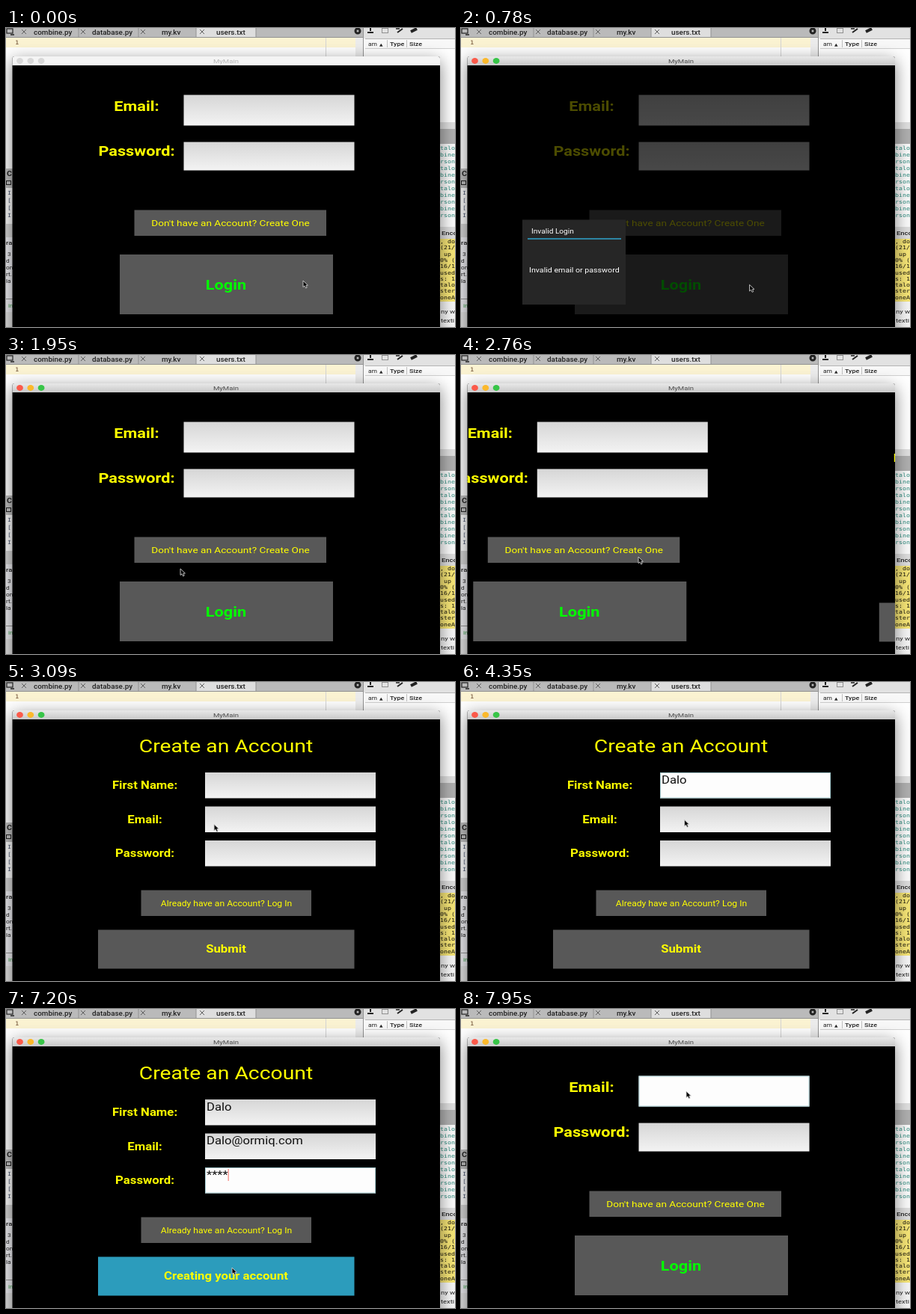
Write an HTML page with a canvas that moves like this. It is 600 px wide and 400 px high and loops after 8000 ms.

```html
<!DOCTYPE html>
<html lang="en">
<head>
<meta charset="utf-8">
<title>Account sign-up</title>
<style>
  html, body { margin: 0; width: 100%; height: 100%; overflow: hidden; background: #000; }
  canvas { display: block; width: 600px; height: 400px; }
</style>
</head>
<body>
<canvas id="stage" width="600" height="400"></canvas>
<script>
const ctx = document.getElementById('stage').getContext('2d');

const LOOP = 8000;
const ASPECT = 1.18; // the whole screen is shown wider than its pixels
const WIN = { x: 8.5, y: 38, w: 571.5, bar: 12 };
const SANS = 'Roboto, "Open Sans", sans-serif';
const MONO = '"DejaVu Sans Mono", monospace';
const YELLOW = '#ffff00', GREY = '#585858', PRESSED = '#2c9cbc';
const INK = '#222', RULE = '#929292', TEAL = '#2a8a7c';

const NAME = 'Dalo', EMAIL = 'Dalo@ormiq.com', USER = 'talok';

// Moments of the story, in ms
const T = {
  active: 300, loginDown: 560, popup: 690, dismiss: 1680,
  createDown: 2580, toCreate: 2713.5,
  focusName: 3400, focusEmail: 4480, focusPass: 5980,
  submitDown: 7080, toLogin: 7300, focusLogin: 7690
};
const SLIDE = 200, FADE = 60, BLINK = 250;

// Pointer path: time, x, y
const PATH = [
  [0, 397, 338], [250, 394, 340], [700, 388, 344], [840, 384, 343], [1300, 228, 302],
  [1700, 229, 302], [2200, 237, 270], [2800, 237, 270], [3300, 303, 142],
  [4150, 303, 142], [4400, 298, 189], [5700, 299, 188], [5960, 305, 231],
  [6720, 305, 231], [7040, 302, 346], [7420, 302, 346], [7680, 301, 110], [8000, 301, 110]
];

const clamp = v => Math.max(0, Math.min(1, v));
const ease = v => v * v * (3 - 2 * v);
const between = (t, a, b) => t >= a && t < b;
const typed = (s, t, start, step) =>
  s.slice(0, Math.max(0, Math.floor((t - start) / step) + 1));

function rect(x, y, w, h, fill) {
  ctx.fillStyle = fill;
  ctx.fillRect(x, y, w, h);
}

function line(x1, y1, x2, y2, color, width = 1) {
  ctx.strokeStyle = color;
  ctx.lineWidth = width;
  ctx.beginPath();
  ctx.moveTo(x1, y1);
  ctx.lineTo(x2, y2);
  ctx.stroke();
}

function shade(y, h, top, bottom) {
  const g = ctx.createLinearGradient(0, y, 0, y + h);
  g.addColorStop(0, top);
  g.addColorStop(1, bottom);
  return g;
}

function text(s, x, y, size, color, { weight = 400, align = 'left', font = SANS } = {}) {
  ctx.save();
  ctx.translate(x, y);
  ctx.scale(ASPECT, 1);
  ctx.font = `${weight} ${size}px ${font}`;
  ctx.textAlign = align;
  ctx.fillStyle = color;
  ctx.fillText(s, 0, 0);
  ctx.restore();
}

function lines(list, x, y, step, size, color, font = MONO) {
  list.forEach((s, i) => text(s, x, y + i * step, size, color, { font }));
}

function label(s, x, y, size, color = YELLOW, weight = 700) {
  text(s, x, y, size, color, { weight, align: 'center' });
}

function button(x, y, w, h, down) {
  rect(x, y, w, h, down ? PRESSED : GREY);
}

function field(x, y, w, h, value, t, focusAt, blurAt) {
  const focus = between(t, focusAt, blurAt);
  rect(x, y, w, h, focus ? '#fdfdfd' : shade(y, h, '#d6d6d6', '#f3f3f3'));
  if (focus) {
    ctx.strokeStyle = '#a8cfd4';
    ctx.lineWidth = 1;
    ctx.strokeRect(x + .5, y + .5, w - 1, h - 1);
  }
  text(value, x + 2, y + 14.5, 14.1, '#111');
  if (focus && Math.floor((t - focusAt) / BLINK) % 2 === 0) {
    ctx.font = `14.1px ${SANS}`;
    const cx = x + 2.5 + ctx.measureText(value).width * ASPECT;
    line(cx, y + 2, cx, y + 18, '#f46a60');
  }
}

function drawTabs() {
  rect(0, 0, 477, 12, '#bababa');
  rect(254, 0, 80, 12, '#dedede');
  for (const x of [97, 177, 254, 334]) line(x, 0, x, 12, RULE);
  [[24, 37, 'combine.py'], [103, 115, 'database.py'], [183, 208, 'my.kv'], [262, 281, 'users.txt']]
    .forEach(([cx, tx, s]) => {
      line(cx - 3, 2, cx + 3, 8, '#606060');
      line(cx - 3, 8, cx + 3, 2, '#606060');
      text(s, tx, 8.5, 8.4, INK, { weight: 500 });
    });
  line(0, 12.5, 477, 12.5, RULE);
  ctx.strokeStyle = INK;
  ctx.lineWidth = 1.2;
  ctx.strokeRect(1, 1, 8, 6);
  line(6, 9, 11, 9, INK, 1.5);
  ctx.lineWidth = 3;
  ctx.beginPath();
  ctx.arc(470, 4, 3, 0, 7);
  ctx.stroke();
}

function drawFilePanel() {
  rect(477, 0, 123, 128, '#ffffff');
  rect(477, 0, 123, 14, '#e2e2e2');
  rect(480, 14, 120, 13, '#f8f8f8');
  line(477.5, 0, 477.5, 38, RULE);
  line(480, 14.5, 600, 14.5, '#b4b4b4');
  line(480, 27.5, 600, 27.5, '#d0d0d0');
  line(487, 0, 487, 4, INK, 2);
  line(483, 6, 491, 6, INK, 2);
  ctx.strokeStyle = '#909090';
  ctx.lineWidth = 1;
  ctx.strokeRect(502.5, .5, 8, 6);
  line(521, 1, 526, 1, INK, 1.5);
  line(523, 6, 530, 1, INK, 2);
  line(541, 5, 549, 1, INK, 4);
  text('am', 484, 24, 7.2, INK);
  text('▲', 499, 23.5, 5, INK, { font: '"DejaVu Sans", sans-serif' });
  text('Type', 513, 24, 7.6, INK, { weight: 500 });
  text('Size', 539, 24, 7.6, INK, { weight: 500 });
  line(509.5, 16, 509.5, 26, '#c0c0c0');
  line(535.5, 16, 535.5, 26, '#c0c0c0');
}

function drawDesktop() {
  rect(0, 0, 600, 400, '#ececf0');
  rect(0, 13, 477, 175, '#fefefe');
  rect(0, 13, 467, 13, '#fbf3d2');
  rect(467, 13, 10, 30, '#ececec');
  line(427.5, 13, 427.5, 38, '#d4d4d4');
  text('1', 12, 22, 7.5, '#6a4a30', { font: MONO });
  drawTabs();
  drawFilePanel();

  // Right edge
  rect(578, 126, 22, 9, '#e0e0e0');
  rect(578, 135, 22, 20, '#b0b0b0');
  rect(578, 155, 22, 112, '#fbfbfb');
  const path = [USER, 'bine/', 'rsona'];
  lines([...path, ...path, ...path], 580, 163, 9, 7, TEAL);
  lines(['bine/', 'rsona'], 580, 244, 8.5, 7, TEAL);
  rect(578, 266, 22, 16, '#dedede');
  text('Enco', 582, 277, 8, INK, { weight: 500 });
  rect(578, 282, 22, 84, '#f6e576');
  lines([', do', '(21/', ' up', '0% (', '16/1', 'used', 's: 1', USER, 'ster', 'oneA'],
    580, 288, 8.3, 7, '#15130a');
  rect(578, 366, 22, 34, '#f6f6f6');
  lines(['ny w', 'texti'], 581, 382, 12, 8, INK, SANS);

  // Left edge
  rect(0, 188, 9, 26, '#bdbdbd');
  text('C', 1, 198, 9, INK, { weight: 700 });
  ctx.strokeStyle = INK;
  ctx.lineWidth = 1;
  ctx.strokeRect(.5, 204.5, 6, 5);
  rect(0, 214, 9, 48, '#fbfbfb');
  lines(['I', '[', '[', 'I'], 2, 223, 10, 7, '#45506a');
  rect(0, 262, 9, 18, '#d4d4d4');
  text('ra', 0, 290, 8, INK, { weight: 500 });
  lines([' 3', 'd', 'on', 'rt.', 'la'], 0, 305, 9, 7, INK, SANS);
  line(0, 362.5, 9, 362.5, RULE);
  text('in', 3, 374, 7, '#3f9f4c');
  rect(0, 380, 9, 20, '#e0e0e0');
}

function drawWindowFrame(t) {
  const on = t >= T.active;
  ctx.save();
  ctx.shadowColor = 'rgba(0,0,0,.5)';
  ctx.shadowBlur = 22;
  ctx.shadowOffsetY = 6;
  ctx.fillStyle = '#000';
  ctx.beginPath();
  ctx.roundRect(WIN.x, WIN.y, WIN.w, 420, 3);
  ctx.fill();
  ctx.restore();

  ctx.fillStyle = on ? shade(38, 12, '#e8e8e8', '#c8c8c8') : '#f4f4f4';
  ctx.beginPath();
  ctx.roundRect(WIN.x, WIN.y, WIN.w, WIN.bar, [3, 3, 0, 0]);
  ctx.fill();
  ['#fb5a4a', '#fbb92c', '#38c548'].forEach((c, i) => {
    ctx.fillStyle = on ? c : '#d8d8d8';
    ctx.beginPath();
    ctx.ellipse(18.5 + i * 14.3, 44, 4.4, 3.9, 0, 0, 7);
    ctx.fill();
  });
  label('MyMain', 294, 47, 8.1, on ? '#484848' : '#b4b4b4', 400);
}

function drawLogin(t) {
  label('Email:', 174.5, 111, 18.4);
  label('Password:', 174.5, 171, 18.4);
  field(237.5, 89.5, 228, 41, '', t, T.focusLogin, LOOP);
  field(237.5, 152.5, 228, 38, '', t, LOOP, LOOP);
  button(171.5, 243.5, 256.5, 34.5, between(t, T.createDown, T.toCreate));
  label("Don't have an Account? Create One", 300, 265, 11.55, YELLOW, 400);
  button(152, 303, 285, 80, between(t, T.loginDown, T.popup));
  label('Login', 294, 349.5, 18.4, '#00ff00');
}

function drawCreate(t) {
  label('Create an Account', 294, 94, 24, YELLOW, 400);
  label('First Name:', 185.5, 143, 14.2);
  label('Email:', 185.5, 188.5, 14.2);
  label('Password:', 185.5, 234, 14.2);
  field(266, 121, 228, 34.5, typed(NAME, t, 3600, 150), t, T.focusName, T.focusEmail);
  field(266, 166.5, 228, 34.5, typed(EMAIL, t, 4650, 75), t, T.focusEmail, T.focusPass);
  field(266, 212, 228, 34.5, typed('****', t, 6240, 120), t, T.focusPass, LOOP);
  button(180.5, 278.5, 227.5, 34.5, false);
  label('Already have an Account? Log In', 294.5, 300, 10.3, YELLOW, 400);
  button(123, 331.5, 342.5, 52, between(t, T.submitDown, T.toLogin));
  label(t >= T.submitDown ? 'Creating your account' : 'Submit', 294, 362, 14.2);
}

function drawPopup(t) {
  const a = Math.min(clamp((t - T.popup) / FADE), 1 - clamp((t - T.dismiss) / FADE));
  if (a <= 0) return;
  ctx.save();
  ctx.globalAlpha = a;
  rect(WIN.x, 50, WIN.w, 350, 'rgba(0,0,0,.7)');
  rect(82, 256.5, 138, 113.5, '#262626');
  text('Invalid Login', 94, 274.5, 8.6, '#ffffff');
  line(89, 282, 214, 282, '#2fa4cc', 1.6);
  text('Invalid email or password', 91, 327, 9.03, '#ffffff');
  ctx.restore();
}

function page(dx, draw, t) {
  ctx.save();
  ctx.translate(dx, 0);
  draw(t);
  ctx.restore();
}

// Slides from one page to the next, both moving left
function slide(t, start, from, to) {
  const dx = WIN.w * clamp((t - start) / SLIDE);
  if (dx < WIN.w) page(-dx, from, t);
  if (dx > 0) page(WIN.w - dx, to, t);
}

function drawPointer(t) {
  let i = 1;
  while (i < PATH.length - 1 && PATH[i][0] <= t) i++;
  const [t0, x0, y0] = PATH[i - 1], [t1, x1, y1] = PATH[i];
  const k = ease(clamp((t - t0) / (t1 - t0)));
  ctx.save();
  ctx.translate(x0 + (x1 - x0) * k, y0 + (y1 - y0) * k);
  ctx.beginPath();
  [[0, 0], [0, 8.6], [2, 6.9], [3.6, 10], [5.2, 9.2], [3.9, 6.3], [6.4, 6.1]]
    .forEach(p => ctx.lineTo(...p));
  ctx.closePath();
  ctx.fillStyle = '#0a0a0a';
  ctx.strokeStyle = '#d0d0d0';
  ctx.lineWidth = .9;
  ctx.fill();
  ctx.stroke();
  ctx.restore();
}

function draw(t) {
  drawDesktop();
  drawWindowFrame(t);
  ctx.save();
  ctx.beginPath();
  ctx.rect(WIN.x, WIN.y + WIN.bar, WIN.w, 350);
  ctx.clip();
  if (t < 5000) slide(t, T.toCreate, drawLogin, drawCreate);
  else slide(t, T.toLogin, drawCreate, drawLogin);
  drawPopup(t);
  ctx.restore();
  drawPointer(t);
}

const begin = performance.now();
function tick() {
  draw((performance.now() - begin) % LOOP);
  requestAnimationFrame(tick);
}
tick();
</script>
</body>
</html>
```
